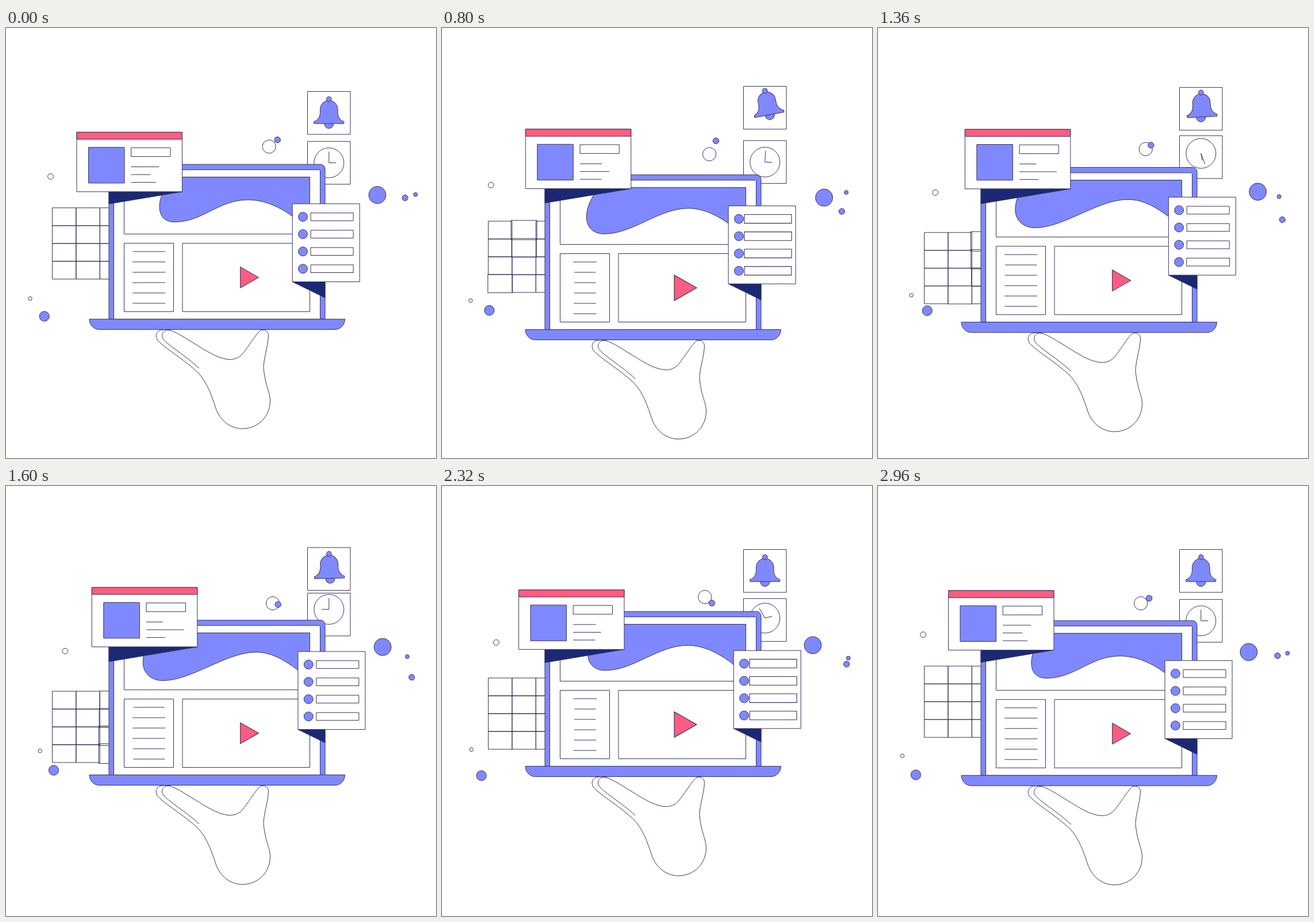
Write an HTML page with a canvas that moves like this. It is 748x748 px and loops after 3.04 s.

```html
<!DOCTYPE html>
<html lang="en">
<head>
<meta charset="utf-8">
<title>Laptop with floating windows</title>
<style>
html, body { margin: 0; width: 100%; height: 100%; overflow: hidden; background: #fff; }
canvas { display: block; }
</style>
</head>
<body>
<canvas id="stage" width="748" height="748"></canvas>
<script>
const c = document.getElementById('stage').getContext('2d');
const LOOP = 3040, STEP = 80;
const BLUE = '#8088ff', PINK = '#ff5c80', NAVY = '#1c2873', INK = '#35335f', WHITE = '#fff';
let t = 0;

// Periodic sway: the first harmonic and, where needed, the second.
function wave(mid, cos1, sin1, cos2 = 0, sin2 = 0) {
  const a = 2 * Math.PI * t / LOOP;
  return mid + cos1 * Math.cos(a) + sin1 * Math.sin(a) + cos2 * Math.cos(2 * a) + sin2 * Math.sin(2 * a);
}

const sine = x => (1 - Math.cos(Math.PI * x)) / 2;
const cubic = x => x < .5 ? 4 * x ** 3 : 1 - 4 * (1 - x) ** 3;
const ramp = (time, half) => Math.max(0, 1 - Math.abs(time / half - 1));

// One rise and fall per loop, or two with pulse; each side lasts half ms.
const bump = (start, half) => sine(ramp(t - start, half));
const pulse = (start, half, ease) => ease(ramp((t - start + LOOP) % (LOOP / 2), half));
const swell = () => sine(2 * t / LOOP);

function paint(path, fill) {
  if (fill) { c.fillStyle = fill; c.fill(path); }
  c.stroke(path);
}
const shape = (d, fill) => paint(new Path2D(d), fill);
const line = (x1, y1, x2, y2) => shape(`M${x1} ${y1}L${x2} ${y2}`);
function rect(x, y, w, h, fill = WHITE) {
  const p = new Path2D();
  p.rect(x, y, w, h);
  paint(p, fill);
}
function circle(x, y, r, fill = WHITE) {
  const p = new Path2D();
  p.arc(x, y, r, 0, 7);
  paint(p, fill);
}
function group(x, y, draw, degrees = 0, scale = 1) {
  c.save();
  c.translate(x, y);
  c.rotate(degrees * Math.PI / 180);
  c.scale(scale, scale);
  draw();
  c.restore();
}

// Each bubble drifts on its own tilted ellipse.
function bubbles() {
  circle(wave(461.2, -3.5, 3.7), wave(206.3, 0, 13.3), 11.6);
  circle(wave(473, -.8, 3.5), wave(200, -5.5, -4.2), 5.2, BLUE);
  circle(wave(653.1, -5.5, 9.4, -1.6, -1), wave(286, 4.5, 9.5), 15, BLUE);
  circle(wave(699.6, -5.5, -4.6), wave(314.5, -19, 3), 5.1, BLUE);
  circle(wave(705, 7.3, -1.2), wave(292.7, -3, -7), 3.4, BLUE);
  circle(wave(89.8, -12.3, -5.5), wave(272.8, -14.5, -.7), 4.9);
  circle(wave(50.5, -8.5, -1.5), wave(466.3, 4.3, 8.2), 3.2);
  circle(wave(75.4, -8.7, 6.2), wave(497.5, 4, -6), 8.6, BLUE);
}

function swing(time) {
  const fade = 1 - (time / 1760) ** 2;
  return time > 220 && fade > 0 ? 14 * fade * Math.sin((time - 220) * Math.PI / 360) : 0;
}

function bell() {
  const lift = bump(0, 1000), y = 123.7 - 16 * lift;
  rect(524.5, 110.5 - 10 * lift, 74.5, 74.5);
  group(561.8, y, () => circle(0, 43, 8, BLUE), swing(t - 60));
  group(561.8, y, () => {
    shape('M-26 42.5V39C-18 36-15.3 30-15.3 22V17.5A15.3 15.3 0 0 1 15.3 17.5V22C15.3 30 18 36 26 39V42.5Z', BLUE);
    circle(0, 0, 4.3, BLUE);
  }, swing(t));
}

function clock() {
  const x = Math.min(1, Math.max(0, (t - 590) / 2020));
  const turn = x < .5 ? 4 * x ** 3 : 1 - 2 * (1 - x) ** 2;
  const y = 234.5 - 20 * bump(640, 1000);
  rect(524.5, 197.3 - 11 * bump(560, 1000), 74.5, 74.5);
  circle(561.8, y, 26);
  group(561.8, y, () => line(0, 0, 0, -19.5), 720 * turn);
  group(561.8, y, () => line(0, 0, 12.5, 0), 360 * turn);
}

function grid() {
  const top = wave(335, -22.2, -.8);
  for (let col = 0; col < 3; col++) {
    for (let row = 0; row < 4; row++) {
      group(101.2 + 41.4 * col, top + 15.5 + 31 * row, () => rect(-20.7, -15.5, 41.4, 31, null),
        0, 1 + .1 * bump(80 + 500 * col + 80 * row, 300));
    }
  }
}

function hand() {
  shape('M272 524.6C262 525 258 535 264 543C279 559 309 575 335 600C350 617 357 637 366 664' +
    'C375 686 394 697 412 696.5C440 696 460 674 459.5 647C459 632 451 622 448 591' +
    'C448 575 455 557 456.5 536C457 527 450 523 443 525.5C436 530 424 551 411 567' +
    'C398 581 380 577 361 568C337 556 303 531 286 525.5C282 524 277 524 272 524.6Z', WHITE);
  shape('M286 525.5C274 523 269 532 273 540C283 553 312 569 336 591.5');
}

function blob() {
  const m = swell();
  const left = 267 - 29 * m, low = 337 + 5 * m, lowX = 293 - 20 * m;
  const crest = 298.5 - 6 * m, crestX = 421 + 14 * m, edgeX = 498 + 10 * m;
  shape(`M528.5 259H${290 - 32 * m}C${276 - 30 * m} 276 ${left} 294 ${left} 310
    C${left} 328 ${277 - 26 * m} ${low} ${lowX} ${low}
    C${lowX + 50} ${low} ${crestX - 52} ${crest} ${crestX} ${crest}
    C${crestX + 29} ${crest} ${edgeX - 20} ${312 - 3 * m} ${edgeX} ${327 - 3 * m}L528.5 347Z`, BLUE);
}

function laptop() {
  hand();
  shape('M179 506V244.8a8 8 0 0 1 8-8H547a8 8 0 0 1 8 8V506Z', BLUE);
  shape('M187.5 506V246.2H544.5a2 2 0 0 1 2 2V506Z', WHITE);
  rect(205.5, 259, 323, 99);
  blob();
  rect(205.5, 374, 86, 119);
  rect(307, 374, 221.5, 119);
  for (let i = 0; i < 6; i++) {
    const y = 388.5 + 18 * i;
    const half = 28.5 - 10 * pulse(42 * ((6 - i) % 6) - 90, 680, sine);
    line(248.7 - half, y, 248.7 + half, y);
  }
  group(423.6, 433.5, () => shape('M-16-18.3L16 0L-16 18.3Z', PINK), 0, 1 + .22 * pulse(0, 760, cubic));
  shape('M145 506H589.5A17 18 0 0 1 572 524H162.5A17 18 0 0 1 145 506Z', BLUE);
}

function profileCard() {
  const x = wave(138, -13.6, 4.8, -1.4), y = wave(178.5, 2.5, -2.2, .3, -1);
  const right = x + 183.5, bottom = y + 103.5, m = swell();
  shape(`M179 ${bottom}H${right}L179 ${bottom + (right - 179) * .167}Z`, NAVY);
  group(x, y, () => {
    rect(0, 0, 183.5, 103.5);
    rect(0, 0, 183.5, 12.3, PINK);
    rect(20.5, 26.3, 62.5, 62.2, BLUE);
    rect(94.7, 27, 68.3, 15.3);
    [49 - 20 * m, 34 + 32 * m, 43 - 10 * m].forEach((length, i) => {
      const rowY = 60.2 + 13.5 * i;
      line(94.5, rowY, 94.5 + length, rowY);
    });
  });
}

function listCard() {
  const x = wave(502.7, -4.5, -4.95), y = wave(297.8, 8, 12.3);
  const bottom = y + 135.7;
  shape(`M${x} ${bottom}H555V${bottom + (555 - x) * .49}Z`, NAVY);
  group(x, y, () => {
    rect(0, 0, 117, 135.7);
    for (let i = 0; i < 4; i++) {
      const row = 22.7 + 30.1 * i;
      circle(18.3, row, 7.9, BLUE);
      group(68.9, row, () => rect(-37, -6.8, 74, 13.6), 0, 1 + .11 * pulse(100 + 80 * i, 600, cubic));
    }
  });
}

function frame(now) {
  t = Math.floor(now % LOOP / STEP) * STEP;
  c.fillStyle = WHITE;
  c.fillRect(0, 0, 748, 748);
  c.strokeStyle = INK;
  c.lineWidth = 1;
  c.lineJoin = 'round';
  bubbles();
  bell();
  clock();
  grid();
  group(0, wave(0, .4, 18.6), laptop);
  profileCard();
  listCard();
  requestAnimationFrame(frame);
}
requestAnimationFrame(frame);
</script>
</body>
</html>
```
